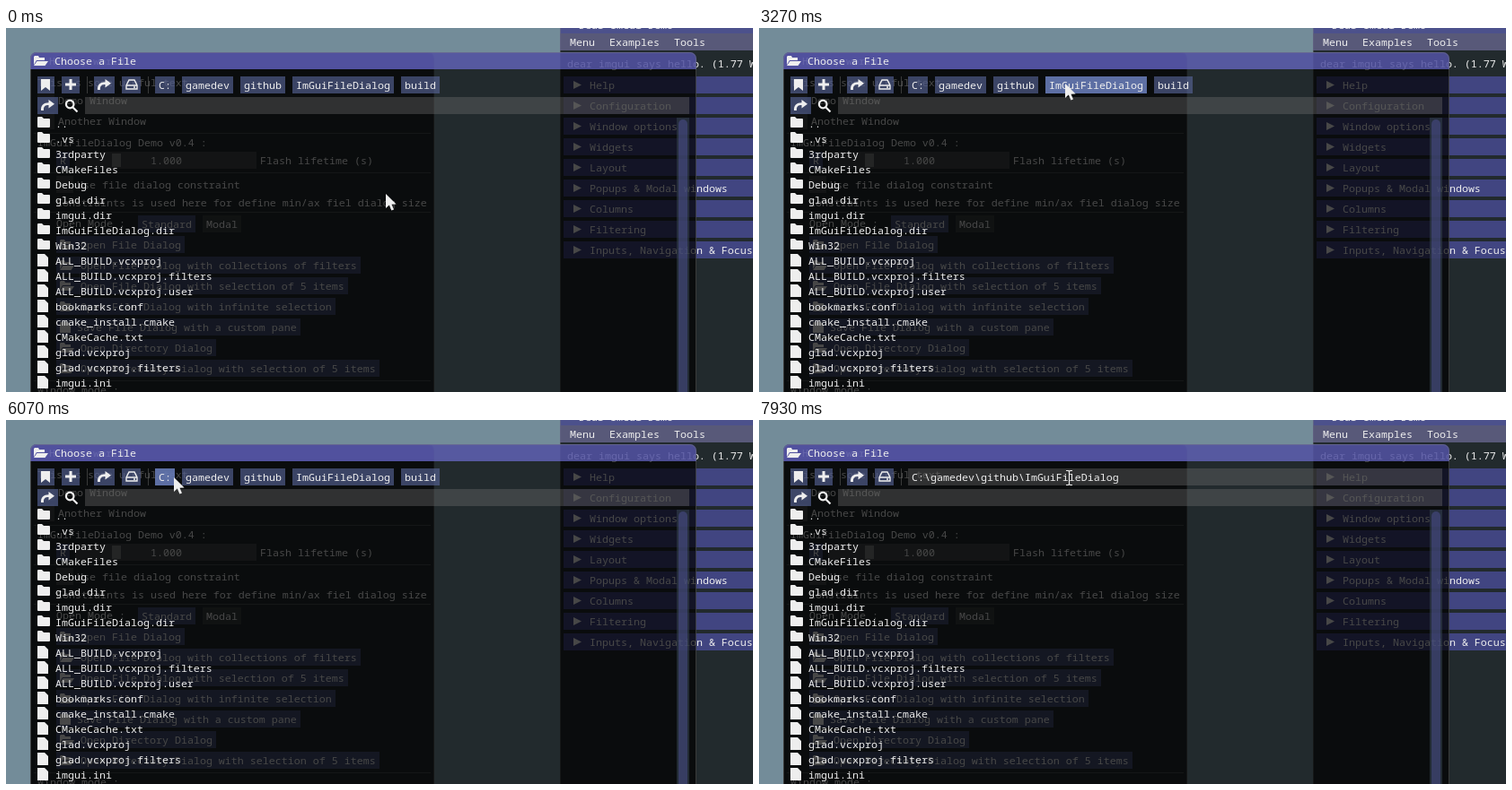
These frames come from a looping animation (832x406 px, 8 s). An HTML page with a canvas:

```html
<!DOCTYPE html>
<html>
<head>
<meta charset="utf-8">
<style>
html, body { margin: 0; width: 832px; height: 406px; overflow: hidden; background: #738c99; }
canvas { display: block; }
</style>
</head>
<body>
<canvas id="stage" width="832" height="406"></canvas>
<script>
const g = document.getElementById('stage').getContext('2d');

const TEXT = '#eee', WINDOW = 'rgba(0,0,0,.7)', BORDER = 'rgba(128,128,128,.4)',
  TITLE = 'rgba(69,69,138,.83)', TITLE_ACTIVE = 'rgba(82,82,161,.87)', MENU = 'rgba(102,102,140,.8)',
  FRAME = 'rgba(110,110,110,.39)', HEADER = 'rgba(102,102,230,.45)',
  BUTTON = 'rgba(89,102,156,.62)', HOVER = 'rgba(102,122,181,.9)', MUTED = 'rgba(128,128,128,.2)',
  TRACK = 'rgba(51,64,77,.6)', GRAB = 'rgba(102,102,204,.3)';
const CHAR = 7, LINE = 13, FIELD = 19, GAP = 4, PAD = 8;

const crumbs = ['C:', 'gamedev', 'github', 'ImGuiFileDialog', 'build'];
const folders = ['..', '.vs', '3rdparty', 'CMakeFiles', 'Debug', 'glad.dir', 'imgui.dir', 'ImGuiFileDialog.dir', 'Win32'];
const files = ['ALL_BUILD.vcxproj', 'ALL_BUILD.vcxproj.filters', 'ALL_BUILD.vcxproj.user', 'bookmarks.conf',
  'cmake_install.cmake', 'CMakeCache.txt', 'glad.vcxproj', 'glad.vcxproj.filters', 'imgui.ini'];
const headers = ['Help', 'Configuration', 'Window options', 'Widgets', 'Layout', 'Popups & Modal windows',
  'Columns', 'Filtering', 'Inputs, Navigation & Focus'];
const launchers = ['Open File Dialog', 'Open File Dialog with collections of filters',
  'Open File Dialog with selection of 5 items', 'Open File Dialog with infinite selection',
  'Save File Dialog with a custom pane', 'Open Directory Dialog', 'Open Directory Dialog with selection of 5 items'];

// Each visit: move off, arrive over a crumb, edit the path up to it. Times in ticks of 1/15 s.
const visits = [
  { go: 11, at: 15, edit: 24, parts: 5, x: 453, y: 60, drift: 11 },
  { go: 43, at: 50, edit: 53, parts: 4, x: 323, y: 62, drift: 2 },
  { go: 63, at: 67, edit: 70, parts: 3, x: 283, y: 64, drift: 0 },
  { go: 77, at: 79, edit: 84, parts: 2, x: 219, y: 65, drift: 0 },
  { go: 89, at: 92, edit: 94, parts: 1, x: 176, y: 64, drift: 1 },
  { go: 106, at: 110, edit: 112, parts: 4, x: 343, y: 63, drift: 3 },
];

const icons = {
  folder: 'M0 1Q0 0 1 0H5L7 2H13Q14 2 14 3V11Q14 12 13 12H1Q0 12 0 11Z',
  open: 'M0 10V1L1 0H5L6 2H12V5H3ZM0 11L3.5 6H16L12.5 11Z',
  file: 'M0 0H8L12 4V14H0Z',
  save: 'M0 0H9L12 3V12H0Z',
  triangle: 'M0 0L9 4.5L0 9Z',
  bookmark: 'M0 0H10V13L5 9L0 13Z',
  plus: 'M4.5 0H7.5V4.5H12V7.5H7.5V12H4.5V7.5H0V4.5H4.5Z',
  share: 'M0 12C-.5 6 3 3.2 8.5 3.2V0L15 4.7L8.5 9.5V6C5 6 2.5 7 3 12Z',
  arrow: 'M0 0V16L3.8 12.6L6.4 18.5L9 17.4L6.5 11.7L11.6 11.5Z',
  drive: 'M1 7L4 1H10L13 7V11H1ZM1 7H13M9 9H11',
  search: 'M9 5A4.3 4.3 0 1 1 .4 5A4.3 4.3 0 1 1 9 5M8 8.5L13 13.5',
  beam: 'M-3.5-8H-1L0-7L1-8H3.5M0-7V7M-3.5 8H-1L0 7L1 8H3.5',
};

function icon(name, x, y, lineWidth) {
  g.save();
  g.translate(x, y);
  g.fillStyle = g.strokeStyle = TEXT;
  g.lineWidth = lineWidth;
  if (lineWidth) g.stroke(new Path2D(icons[name]));
  else g.fill(new Path2D(icons[name]));
  g.restore();
}
function rect(x, y, w, h, color, radius = 0) {
  g.fillStyle = color;
  g.beginPath();
  g.roundRect(x, y, w, h, radius);
  g.fill();
}
function text(s, x, top) {
  g.fillStyle = TEXT;
  g.fillText(s, x, top + 11);
}
const buttonWidth = s => s.length * CHAR + 2 * GAP;
function button(s, x, y, color = BUTTON) {
  rect(x, y, buttonWidth(s), FIELD, color);
  text(s, x + GAP, y + 3);
}
function panel(x, y, w, color, title, titleX) {
  rect(x, y, w, FIELD, color, [7, 7, 0, 0]);
  rect(x, y + FIELD, w, 406, WINDOW);
  g.strokeStyle = BORDER;
  g.beginPath();
  g.roundRect(x + .5, y + .5, w - 1, 500, 7);
  g.stroke();
  text(title, titleX, y + 3);
}

function demoWindow() {
  panel(617, -13, 230, TITLE, 'Dear ImGui Demo', 638);
  rect(617, 6, 230, FIELD, MENU);
  let x = 628;
  for (const s of ['Menu', 'Examples', 'Tools']) {
    text(s, x, 9);
    x += s.length * CHAR + 2 * PAD;
  }
  text('dear imgui says hello. (1.77 WIP)', 625, 33);
  headers.forEach((s, i) => {
    const y = 54 + (FIELD + GAP) * i;
    rect(621, y, 230, FIELD, HEADER);
    icon('triangle', 632, y + 5);
    text(s, 650, y + 3);
  });
}

function helloWindow() {
  const left = 35, indent = left + 21;
  let y = 54;
  const separator = () => rect(31, y, 442, 1, BORDER);
  const label = (s, x) => { text(s, x, y); y += LINE + GAP; };
  const checkbox = (s, x) => {
    rect(x, y, FIELD, FIELD, FRAME);
    text(s, x + FIELD + GAP, y + 3);
    y += FIELD + GAP;
  };

  panel(27, 27, 450, TITLE, 'Hello, world!', 48);
  label('This is some useful text.', left);
  checkbox('Demo Window', left);
  checkbox('Another Window', left);
  separator();
  y += GAP;
  label('ImGuiFileDialog Demo v0.4 :', left);
  button('R', indent, y);
  rect(77, y, 202, FIELD, FRAME);
  rect(118, y + 2, 10, FIELD - 4, 'rgba(255,255,255,.3)');
  text('1.000', 161, y + 3);
  text('Flash lifetime (s)', 283, y + 3);
  y += FIELD + GAP;
  separator();
  y += GAP;
  checkbox('Use file dialog constraint', indent);
  label('Constraints is used here for define min/ax fiel dialog size', indent);
  separator();
  y += GAP;
  text('Open Mode :', indent, y + 2);
  button('Standard', 147, y);
  button('Modal', 219, y, MUTED);
  for (const s of launchers) {
    const save = s.startsWith('Save'), x = indent + (save ? 23 : 27);
    y += FIELD + GAP;
    rect(indent, y, x - indent + s.length * CHAR + GAP, FIELD, BUTTON);
    icon(save ? 'save' : 'open', indent + GAP, y + 4);
    text(s, x, y + 3);
  }
  y += FIELD + GAP;
  separator();
  y += GAP;
  label('Window mode :', left);
}

function dialog(parts, mx, my) {
  const left = 35, right = 761, top = 54, second = top + FIELD + GAP;
  panel(27, 27, 742, TITLE_ACTIVE, 'Choose a File', 54);
  icon('open', 31, 31);

  let x = left;
  for (const [name, width, line] of [['bookmark', 19], ['plus', 20], [], ['share', 23], ['drive', 21, 1.4], []]) {
    rect(x, top, width || 1, FIELD, name ? BUTTON : BORDER);
    if (name) icon(name, x + GAP, top + 3, line);
    x += (width || 0) + PAD;
  }
  if (parts) {
    rect(x, top, right - x, FIELD, FRAME);
    text(crumbs.slice(0, parts).join('\\'), x + GAP, top + 3);
  } else for (const s of crumbs) {
    const w = buttonWidth(s);
    const over = mx >= x && mx < x + w && my >= top && my < top + FIELD;
    button(s, x, top, over ? HOVER : BUTTON);
    x += w + PAD;
  }

  rect(left, second, 23, FIELD, BUTTON);
  icon('share', left + GAP, second + 3);
  icon('search', 66.5, second + 3, 2.2);
  rect(88, second, right - 88, FIELD, FRAME);

  [...folders, ...files].forEach((s, i) => {
    const y = 100 + (LINE + GAP) * i;
    icon(i < folders.length ? 'folder' : 'file', left, y - 1);
    text(s, 55, y);
  });
  rect(right - 14, 100, 14, 320, TRACK);
  rect(right - 12, 102, 10, 320, GRAB, 5);
}

const mix = (a, b, k) => a + (b - a) * Math.min(1, Math.max(0, k));

// A curved swing to the right, then straight moves between visits.
function pointerAt(tick) {
  const s = Math.min(1, tick / 8), r = 1 - s;
  let x = r * r * 423 + 2 * r * s * 290 + s * s * 552;
  let y = r * r * 185 + 2 * r * s * 70 + s * s * 69;
  let parts = 0;
  for (const v of visits) {
    if (tick < v.go) break;
    const k = (tick - v.go + 1) / (v.at - v.go + 1), d = (tick - v.edit) / 9;
    x = mix(mix(x, v.x, k), v.x + v.drift, d);
    y = mix(mix(y, v.y, k), 65, d);
    parts = tick >= v.edit ? v.parts : 0;
  }
  return { x: Math.round(x), y: Math.round(y), parts };
}

function draw(tick) {
  const { x, y, parts } = pointerAt(tick);
  g.font = '11.667px "Noto Sans Mono", monospace';
  rect(0, 0, 832, 406, '#738c99');
  demoWindow();
  helloWindow();
  dialog(parts, x, y);
  if (parts) icon('beam', x + .5, y - .5, 1.1);
  else icon('arrow', x, y);
}

function frame() {
  draw(Math.floor((performance.now() % 8000 + 4) * .015) % 120);
  requestAnimationFrame(frame);
}
frame();
</script>
</body>
</html>
```
